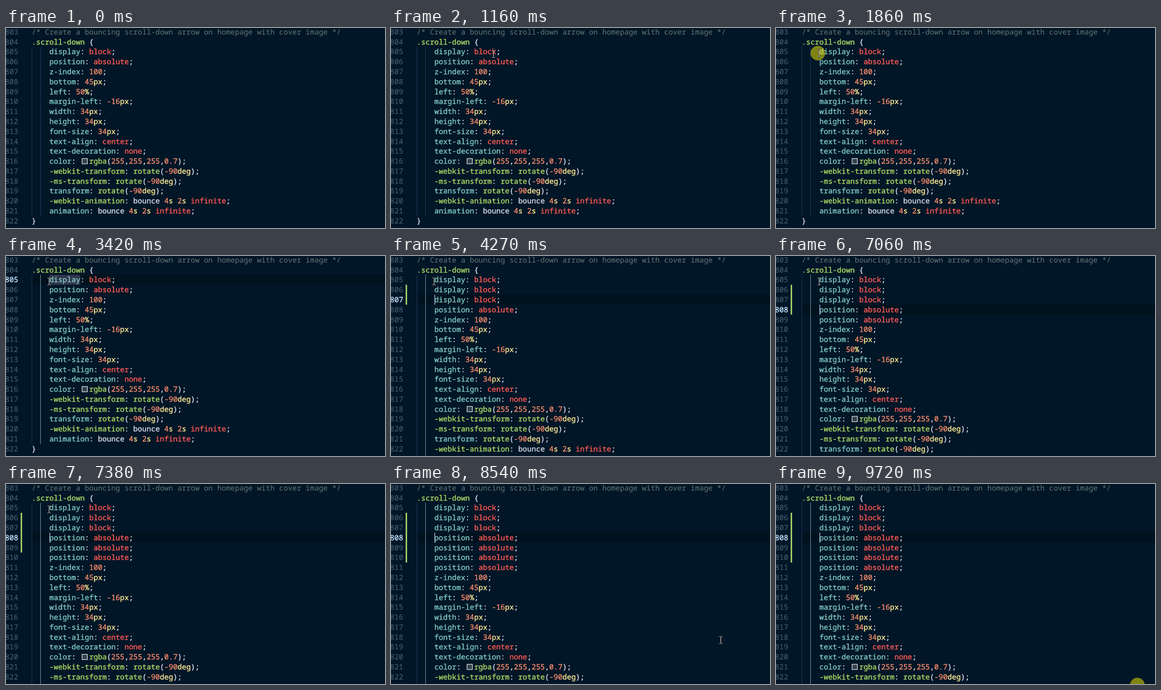
Recreate the animation shown at these times as an HTML page with a canvas. Size 752 px wide and 398 px high, loop 9810 ms.

```html
<!DOCTYPE html>
<html lang="en">
<head>
<meta charset="utf-8">
<title>Duplicating lines in a code editor</title>
<style>
  html, body { margin: 0; width: 100%; height: 100%; overflow: hidden; background: #011627; }
  canvas { display: block; width: 752px; height: 398px; }
</style>
</head>
<body>
<canvas id="stage"></canvas>
<script>
const WIDTH = 752, HEIGHT = 398, LOOP = 9810;
const ROW = 19.79, TOP = -2.1, LEFT = 51, BASELINE = 14.92, EM = 14.62;
const FONT = `${EM}px "Noto Sans Mono", "DejaVu Sans Mono", monospace`;
const color = {
  back: '#011627', activeRow: '#01121f', word: '#32374d',
  lineNo: '#4b6479', activeNo: '#c5e4fd', guide: '#1e385b', activeGuide: '#7e97ac',
  added: '#9ccc65', caret: '#80a4c2', comment: '#637777', plain: '#d6deeb',
  green: '#addb67', prop: '#80cbc4', number: '#f78c6c', unit: '#ffeb95', keyword: '#ff5b55'
};

const source = `/* Create a bouncing scroll-down arrow on homepage with cover image */
.scroll-down {
    display: block;
    position: absolute;
    z-index: 100;
    bottom: 45px;
    left: 50%;
    margin-left: -16px;
    width: 34px;
    height: 34px;
    font-size: 34px;
    text-align: center;
    text-decoration: none;
    color: rgba(255,255,255,0.7);
    -webkit-transform: rotate(-90deg);
    -ms-transform: rotate(-90deg);
    transform: rotate(-90deg);
    -webkit-animation: bounce 4s 2s infinite;
    animation: bounce 4s 2s infinite;
}`.split('\n');

// Moments of user input, in ms
const POINTER_IN = 290, PRESS = 1860, SELECT = 1880, STEP_DOWN = 6140, LAST_PRESS = 9720;
const copiesDown = [3720, 4180];
const copiesUp = [6980, 7240, 7500];
const inputs = [SELECT, ...copiesDown, STEP_DOWN, ...copiesUp];
const LAG = 80, BLINK = 480, PRESS_TIME = 230, MARK_DELAY = 300;

const countUntil = (times, t) => times.filter(time => time <= t).length;
const rowTop = row => TOP + row * ROW;

const canvas = document.getElementById('stage');
const ctx = canvas.getContext('2d');
const ratio = window.devicePixelRatio || 1;
canvas.width = WIDTH * ratio;
canvas.height = HEIGHT * ratio;
ctx.scale(ratio, ratio);
ctx.font = FONT;
ctx.textRendering = 'geometricPrecision';
const CHAR = ctx.measureText('0').width;

function rect(fill, x, y, w, h) {
  ctx.fillStyle = fill;
  ctx.fillRect(x, y, w, h);
}

function text(str, x, row, fill) {
  const y = Math.round(rowTop(row) + BASELINE);
  ctx.fillStyle = ctx.strokeStyle = fill;
  ctx.fillText(str, x, y);
  // Bright text looks slightly heavier than dim text.
  if (fill === color.lineNo || fill === color.comment) return;
  ctx.lineWidth = 0.4;
  ctx.strokeText(str, x, y);
}

function disc(x, y) {
  ctx.fillStyle = 'rgba(255, 240, 0, 0.5)';
  ctx.beginPath();
  ctx.arc(x, y, 14.5, 0, Math.PI * 2);
  ctx.fill();
}

function valueTokens(value) {
  const pattern = /(-?\d[\d.]*)([a-z%]*)|([a-z]+)(?=\()|([a-z]+)|([^a-z\d-]+)/g;
  return [...value.matchAll(pattern)].flatMap(([, num, unit, func, word, other]) =>
    num ? [[num, color.number], [unit, color.unit]]
    : func ? [[func, color.green]]
    : word ? [[word, word === 'bounce' ? color.plain : color.keyword]]
    : [[other, color.plain]]);
}

function tokens(line) {
  if (line.startsWith('/*')) return [[line, color.comment]];
  if (line.startsWith('.')) return [[line.slice(0, -1), color.green], ['{', color.plain]];
  if (line === '}') return [[line, color.plain]];
  const split = line.indexOf(':');
  const name = line.slice(0, split);
  return [
    [name, name.trim().startsWith('-') ? color.green : color.prop],
    [': ', color.plain],
    ...valueTokens(line.slice(split + 2))
  ];
}

function drawSwatch(x, row) {
  const size = 0.8 * EM, y = rowTop(row) + 4;
  rect('#e6e9ec', x + 0.2 * EM, y, size, size);
  rect('#33434d', x + 0.2 * EM + 1.2, y + 1.2, size - 2.4, size - 2.4);
  return 1.2 * EM;
}

function drawLine(line, row) {
  let x = LEFT;
  for (const [str, fill] of tokens(line)) {
    if (str === 'rgba') x += drawSwatch(x, row);
    text(str, x, row, fill);
    x += str.length * CHAR;
  }
}

// Eased travel along a quadratic curve
function glide(t, start, end, from, bend, to) {
  const p = Math.min(1, Math.max(0, (t - start) / (end - start)));
  const u = 1 - (1 - p) ** 3;
  return from.map((a, i) => a * (1 - u) ** 2 + 2 * bend[i] * u * (1 - u) + to[i] * u * u);
}

function pointerAt(t) {
  const enter = [431, 319], turn = [205, 51], rest = [85, 50], exit = [717, 412];
  if (t < 1370) return glide(t, POINTER_IN, 1320, enter, [-106, 51], turn);
  if (t < 8330) return glide(t, 1370, 1550, turn, [150, 45], rest);
  return glide(t, 8330, 8995, rest, [720, 261], exit);
}

const beam = new Path2D('M-3-7h2l1 1 1-1h2M0-6V6M-3 7h2l1-1 1 1h2');
function drawPointer([x, y]) {
  ctx.save();
  ctx.translate(Math.round(x) + 0.5, Math.round(y) + 0.5);
  for (const [stroke, width] of [['#000a', 2.4], ['#f2f2f2', 1]]) {
    ctx.strokeStyle = stroke;
    ctx.lineWidth = width;
    ctx.stroke(beam);
  }
  ctx.restore();
}

function draw(t) {
  const displays = countUntil(copiesDown, t);
  const positions = countUntil(copiesUp, t);
  const added = countUntil([...copiesDown, ...copiesUp], t - LAG);
  const selected = t >= SELECT + LAG;
  const active = selected ? 2 + displays + (t >= STEP_DOWN ? 1 : 0) : -1;
  const lines = source.flatMap((line, i) =>
    Array(1 + (i === 2 ? displays : i === 3 ? positions : 0)).fill(line));

  rect(color.back, 0, 0, WIDTH, HEIGHT);
  if (selected) rect(color.activeRow, LEFT, rowTop(active), WIDTH - LEFT, ROW);
  if (t >= SELECT + MARK_DELAY && t < copiesDown[0]) {
    rect(color.word, LEFT + 4 * CHAR, rowTop(2), 7 * CHAR, ROW);
  }

  const guideHeight = (lines.length - 3) * ROW;
  rect(color.guide, 51, rowTop(2), 1, guideHeight);
  rect(selected ? color.activeGuide : color.guide, 68, rowTop(2), 1, guideHeight);
  rect(color.added, 29, rowTop(3), 3, added * ROW);

  lines.slice(0, 21).forEach((line, row) => {
    text(String(803 + row), -2, row, row === active ? color.activeNo : color.lineNo);
    drawLine(line, row);
  });

  if (selected) {
    const idle = Math.max(0, t - LAG - inputs.findLast(time => time <= t));
    if (Math.floor(idle / BLINK) % 2 === 0) rect(color.caret, 86, rowTop(active), 1.75, ROW);
  }
  if (t >= PRESS && t < PRESS + PRESS_TIME) disc(83, 50);
  if (t >= LAST_PRESS) disc(717, 400);
  if (t >= POINTER_IN) drawPointer(pointerAt(t));
}

const start = performance.now();
function tick() {
  draw((performance.now() - start) % LOOP);
  requestAnimationFrame(tick);
}
tick();
</script>
</body>
</html>
```
